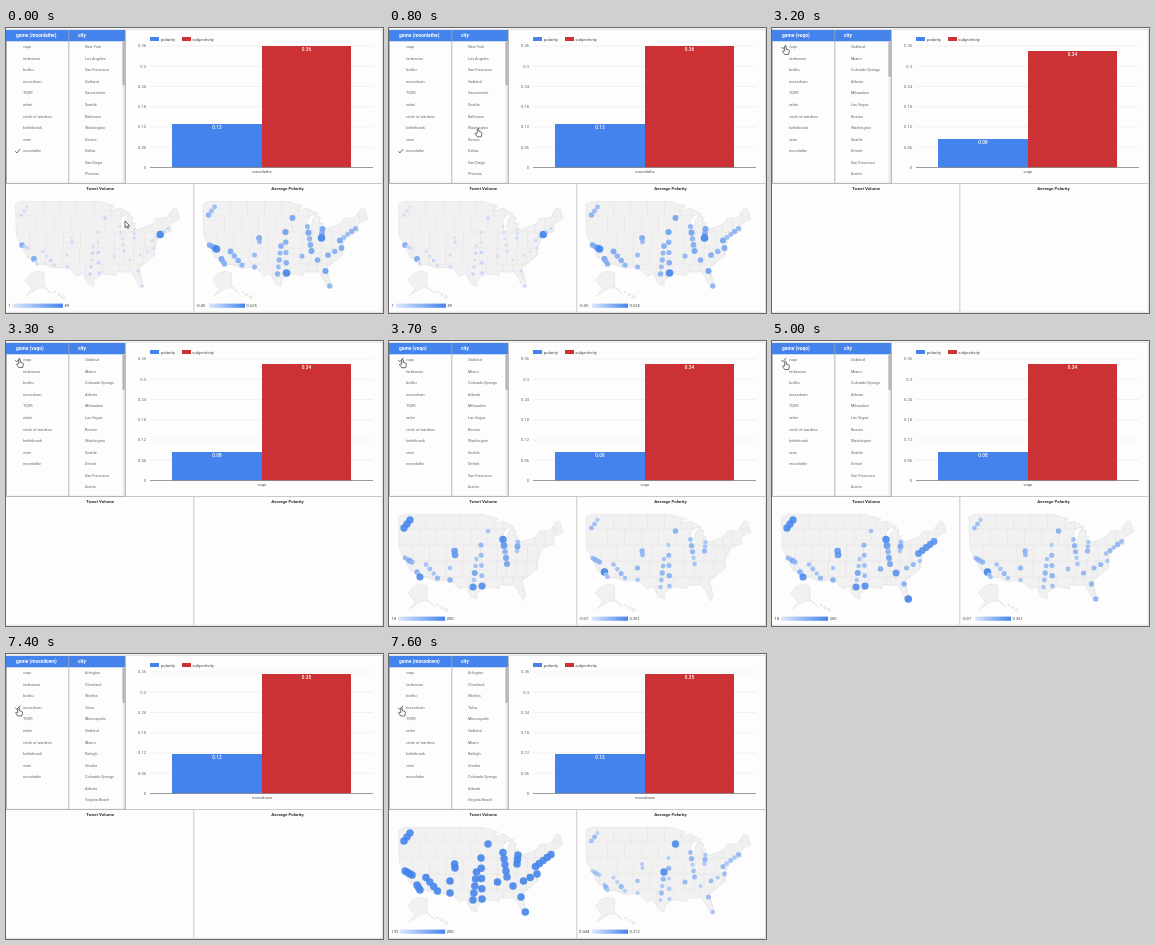
Recreate the animation shown at these times as an HTML page. Size 377 px wide and 285 px high, loop 8 s.

```html
<!DOCTYPE html>
<html lang="en">
<head>
<meta charset="utf-8">
<style>
html, body { margin: 0; width: 100%; height: 100%; overflow: hidden; background: #fdfdfd; }
svg { display: block; width: 100vw; height: 100vh; font-family: Roboto, Arial, sans-serif; }
</style>
</head>
<body>
<svg id="stage" viewBox="0 0 377 285"></svg>
<script>
const LOOP = 8000, BLUE = "#4583ec", RED = "#cb3135";
const svg = document.getElementById("stage");

function add(parent, tag, attrs = {}, content) {
  const node = document.createElementNS("http://www.w3.org/2000/svg", tag);
  for (const key in attrs) node.setAttribute(key, attrs[key]);
  if (content !== undefined) node.textContent = content;
  return parent.appendChild(node);
}
const rect = (p, x, y, width, height, fill) => add(p, "rect", { x, y, width, height, fill });
const line = (p, d, stroke, width = 0.7) => add(p, "path", { d, stroke, "stroke-width": width, fill: "none" });
const text = (p, x, y, str, size, fill, extra) => add(p, "text", { x, y, "font-size": size, fill, ...extra }, str);
const MIDDLE = { "text-anchor": "middle" }, END = { "text-anchor": "end" }, BOLD = { "font-weight": 700 };

const mix = (a, b, v) => a + (b - a) * v;
const shade = v => `rgb(${mix(210, 66, v)},${mix(225, 131, v)},${mix(251, 234, v)})`;
function seeded(seed) {
  return () => (seed = seed * 16807 % 2147483647) / 2147483647;
}

const COAST = `M9.5 176L15 173.4H93.5L109 178L102.6 183.3L114 180L125 186L117 187.5L114 192L115 203H117.5
  L119 192L122.6 187.3L127 189.5L125.7 195H129.4L127.4 203L147 196L151 190H161L167.6 180L171 181L174 191
  L164 196.6L165.3 203L154 207L148.2 220.4L149.4 226.5L133 240L136.8 254.5L134.5 260L129 250L125.5 244
  H109.8L110.3 247.6L97 245.6L87.8 252V258L82 256L77 245.6L70.7 248L61.3 238.7L48.5 240.4L37.7 236.4H31
  L27.4 231.6L21 229.5L15.7 217.5L10.3 208Z`;
const ALASKA = "M19 252L24 246L31 243L38 245V258L46 266L39 260H33L20 268L26 261Z";

// Cities lie along corridors: count, start point, end point
const CORRIDORS = {
  northwest: [3, 21, 179, 15, 187],
  bay: [4, 16, 217, 23, 221],
  socal: [3, 28, 231, 31, 236],
  desert: [4, 37, 223.5, 48.5, 237],
  rio: [2, 61, 227, 61, 239],
  rockies: [2, 65.6, 210, 66, 214],
  plains: [5, 87.5, 218, 84, 246],
  prairie: [5, 92, 204, 93, 245],
  minnesota: [1, 99, 190, 99, 190],
  lakes: [5, 114, 198.5, 118, 223],
  ohio: [3, 129, 201, 128, 210],
  south: [2, 108.5, 228, 124, 232],
  carolina: [3, 134.5, 227, 148, 220],
  northeast: [5, 146.5, 212.5, 162, 200.5],
  florida: [2, 132, 243, 136.3, 258]
};
const CITIES = Object.entries(CORRIDORS).flatMap(([area, [count, x0, y0, x1, y1]]) =>
  Array.from({ length: count }, (_, i) => {
    const p = i / Math.max(1, count - 1);
    return { area, id: area + i, x: mix(x0, x1, p), y: mix(y0, y1, p) };
  }));

const GAMES = ["vuqo", "farbeacon", "brolku", "mossdown", "TQVR", "zelmi", "circle of wardens",
  "kettlebrook", "vemi", "moonlathe"];

// Marker strength is base plus a random share of spread, unless peaks names the area or city
const VIEWS = [
  { from: 0, mapAt: 0, doneAt: 0, game: 9, polarity: 0.13, subjectivity: 0.36, thumb: 44,
    cities: "New York,Los Angeles,San Francisco,Oakland,Sacramento,Seattle,Baltimore,Washington,Denver,Dallas,San Diego,Phoenix",
    maps: [
      { low: "1", high: "89", base: 0, spread: 0.15, peaks: { northeast2: 1, socal0: 0.65, bay0: 0.6 } },
      { low: "-0.45", high: "0.625", base: 0.42, spread: 0.3, peaks: { bay3: 1, prairie4: 1, ohio2: 1 } }] },
  { from: 3200, mapAt: 3400, doneAt: 3800, game: 0, polarity: 0.084, subjectivity: 0.344, thumb: 35.5,
    cities: "Oakland,Miami,Colorado Springs,Atlanta,Milwaukee,Las Vegas,Boston,Washington,Seattle,Detroit,San Francisco,Austin",
    maps: [
      { low: "18", high: "200", base: 0.3, spread: 0.4, peaks: { northwest: 0.95, rockies: 0.8, socal2: 0.9,
        plains4: 0.9, prairie4: 0.9, lakes0: 0.95, lakes1: 0.8, south1: 0.85, northeast: 0.85, florida1: 1 } },
      { low: "-0.07", high: "0.361", base: 0.3, spread: 0.25, peaks: { socal0: 1 } }] },
  { from: 7400, mapAt: 7500, doneAt: 7600, game: 3, polarity: 0.117, subjectivity: 0.354, thumb: 35.5,
    cities: "Arlington,Cleveland,Wichita,Tulsa,Minneapolis,Oakland,Miami,Raleigh,Omaha,Colorado Springs,Atlanta,Virginia Beach",
    maps: [
      { low: "192", high: "200", base: 0.95, spread: 0.05, peaks: {} },
      { low: "0.044", high: "0.212", base: 0.22, spread: 0.3, peaks: { minnesota: 0.95, plains0: 0.95 } }] }
];
const rowY = i => 20.2 + i * 11.57;

function drawFrame() {
  rect(svg, 0, 0, 377, 285, "#fdfdfd");
  const defs = add(svg, "defs");
  const ramp = add(defs, "linearGradient", { id: "ramp" });
  add(ramp, "stop", { offset: 0, "stop-color": "#dce8fc" });
  add(ramp, "stop", { offset: 1, "stop-color": BLUE });
  add(add(defs, "clipPath", { id: "land" }), "path", { d: COAST });
  line(svg, "M0 1.3H376.3V284.3H0", "#d2d2d2");
  line(svg, "M119 155.5H376M187.8 155.5V284", "#bdbdbd", 0.8);

  rect(svg, 0, 2, 119, 11.3, BLUE);
  rect(svg, 116.3, 13.3, 2.7, 142, "#eeeeee");
  line(svg, "M62.8 2V155", "#a9a9a9", 0.8);
  line(svg, "M0.4 13V155.4H119.3V2", "#999", 0.8);
  text(svg, 72, 9.4, "city", 4.9, "#fff", BOLD);
  GAMES.forEach((name, i) => text(svg, 17, rowY(i), name, 3.8, "#666"));

  rect(svg, 144, 9, 9, 4, BLUE);
  rect(svg, 176, 9, 9, 4, RED);
  text(svg, 154.8, 12.7, "polarity", 4.3, "#444");
  text(svg, 186.3, 12.7, "subjectivity", 4.3, "#444");
  for (let i = 0; i <= 6; i++) {
    const y = 139.5 - i * 20.25;
    line(svg, `M144 ${y}H367`, "#e8e8e8", 0.6);
    text(svg, 140, y + 1.4, String(+(i * 0.06).toFixed(2)), 4.1, "#666", END);
  }
  text(svg, 94, 162, "Tweet Volume", 4.4, "#333", { ...MIDDLE, ...BOLD });
  text(svg, 281.5, 162, "Average Polarity", 4.4, "#333", { ...MIDDLE, ...BOLD });
}

function drawBar(g, left, right, value, color) {
  const top = Math.round(139.5 - value * 337.5);
  rect(g, left, top, right - left, 139.5 - top, color);
  text(g, (left + right) / 2, top + 4.9, value.toFixed(2), 4.7, "#fff", { ...MIDDLE, "font-weight": 500 });
}

// State borders: staggered bricks, narrower towards the east
function borderPath() {
  const random = seeded(7);
  let d = "";
  for (let y = 172; y < 252; y += 16) {
    d += `M9 ${y}H175`;
    for (let x = 20 + random() * 12; x < 175; x += x < 105 ? 17 : 10) {
      d += `M${x.toFixed(1)} ${y}v16`;
    }
  }
  return d;
}

function drawMap(parent, dx, data, seed) {
  const g = add(parent, "g", { transform: `translate(${dx} 0)` });
  const land = { fill: "#f1f1f1", stroke: "#dadada", "stroke-width": 0.5, "stroke-linejoin": "round" };
  add(g, "path", { d: COAST, ...land });
  add(g, "path", { d: ALASKA, ...land });
  for (let i = 0; i < 3; i++) {
    add(g, "ellipse", { cx: 49 + i * 4, cy: 264 + i * 2.5, rx: 1 + i * 0.3, ry: 0.8 + i * 0.4, ...land });
  }
  line(g, borderPath(), "#e0e0e0", 0.45).setAttribute("clip-path", "url(#land)");

  const start = 4.5 + data.low.length * 2.2, end = dx ? 51.5 : 58.5 - data.high.length * 0.8;
  text(g, 2.6, 279.2, data.low, 4.1, "#444");
  rect(g, start, 275.6, end - start, 4.2, "url(#ramp)");
  text(g, end + 1.6, 279.2, data.high, 4.1, "#444");

  const random = seeded(seed);
  return CITIES.map(({ area, id, x, y }) => {
    const chance = data.base + data.spread * random();
    const v = data.peaks[id] ?? data.peaks[area] ?? chance;
    return add(g, "circle", { cx: x, cy: y, r: 1.4 + 2.4 * v, fill: shade(v), "fill-opacity": 0.9 });
  });
}

const drawCheck = (g, y, color) => line(g, `M9.3 ${y - 1.1}l1.6 1.7l3.3 -4`, color, 0.8);

function drawView(view, index) {
  const g = add(svg, "g"), name = GAMES[view.game];
  text(g, 10, 9.4, `game (${name})`, 4.9, "#fff", BOLD);
  drawCheck(g, rowY(view.game), "#444");
  rect(g, 116.5, 13.3, 2.3, view.thumb, "#b2b2b2");
  view.cities.split(",").forEach((city, i) => text(g, 79, rowY(i), city, 3.8, "#666"));
  drawBar(g, 166, 256, view.polarity, BLUE);
  drawBar(g, 256, 345, view.subjectivity, RED);
  line(g, "M144 139.5H367", "#777", 0.7);
  text(g, 256, 145.4, name, 4.1, "#555", MIDDLE);
  const maps = add(g, "g");
  const dots = view.maps.map((data, side) => drawMap(maps, side * 187.5, data, 1000 + index * 200 + side * 50));
  return { ...view, g, maps, dots };
}

drawFrame();
const views = VIEWS.map(drawView);
const hoverCheck = drawCheck(svg, 0, "#bbb");
const outline = { fill: "#fff", stroke: "#222", "stroke-width": 0.65, "stroke-linejoin": "round" };
const arrow = add(svg, "path", { d: "M0 0V6.6L1.6 5.2L2.6 7.4L3.6 7L2.6 4.8H4.7Z", ...outline });
const hand = add(svg, "path", {
  d: "M-0.8 5V0.7Q0 -0.3 0.8 0.7V3.2L3.4 3.9Q4 4.2 3.9 5L3.2 8.5H-0.8L-3 5.4Q-2.7 4.3 -1.8 4.9Z", ...outline });

// Time, x and y of the pointer tip
const TRACK = [[0, 119, 193], [900, 88, 97], [1700, 13.5, 17.5], [4900, 13.5, 18.5],
  [5700, 13, 53.5], [LOOP, 12.5, 53.5]];

function pointerAt(t) {
  const i = TRACK.findIndex(key => key[0] > t);
  const [t0, x0, y0] = TRACK[i - 1], [t1, x1, y1] = TRACK[i];
  const p = (t - t0) / (t1 - t0), eased = p * p * (3 - 2 * p);
  return [mix(x0, x1, eased), mix(y0, y1, eased)];
}

const show = (node, on) => node.setAttribute("visibility", on ? "inherit" : "hidden");

function render(time) {
  const t = Math.floor(time % LOOP / 100) * 100;
  const current = views.filter(v => v.from <= t).pop();
  for (const view of views) view.g.style.display = view === current ? "" : "none";
  show(current.maps, t >= current.mapAt);
  const span = current.doneAt - current.mapAt;
  const loaded = span ? (t - current.mapAt) / span : 1;
  current.dots.forEach(set => set.forEach((dot, i) => show(dot, i < loaded * set.length)));

  const [x, y] = pointerAt(t), overTable = x < 119 && y < 155;
  for (const node of [arrow, hand]) node.setAttribute("transform", `translate(${x} ${y})`);
  show(hand, overTable);
  show(arrow, !overTable);

  const row = Math.round((y - 19) / 11.57);
  hoverCheck.setAttribute("transform", `translate(0 ${rowY(row)})`);
  show(hoverCheck, overTable && x < 62 && row !== current.game && row < GAMES.length);
}

const started = performance.now();
function tick() {
  render(performance.now() - started);
  requestAnimationFrame(tick);
}
tick();
</script>
</body>
</html>
```
